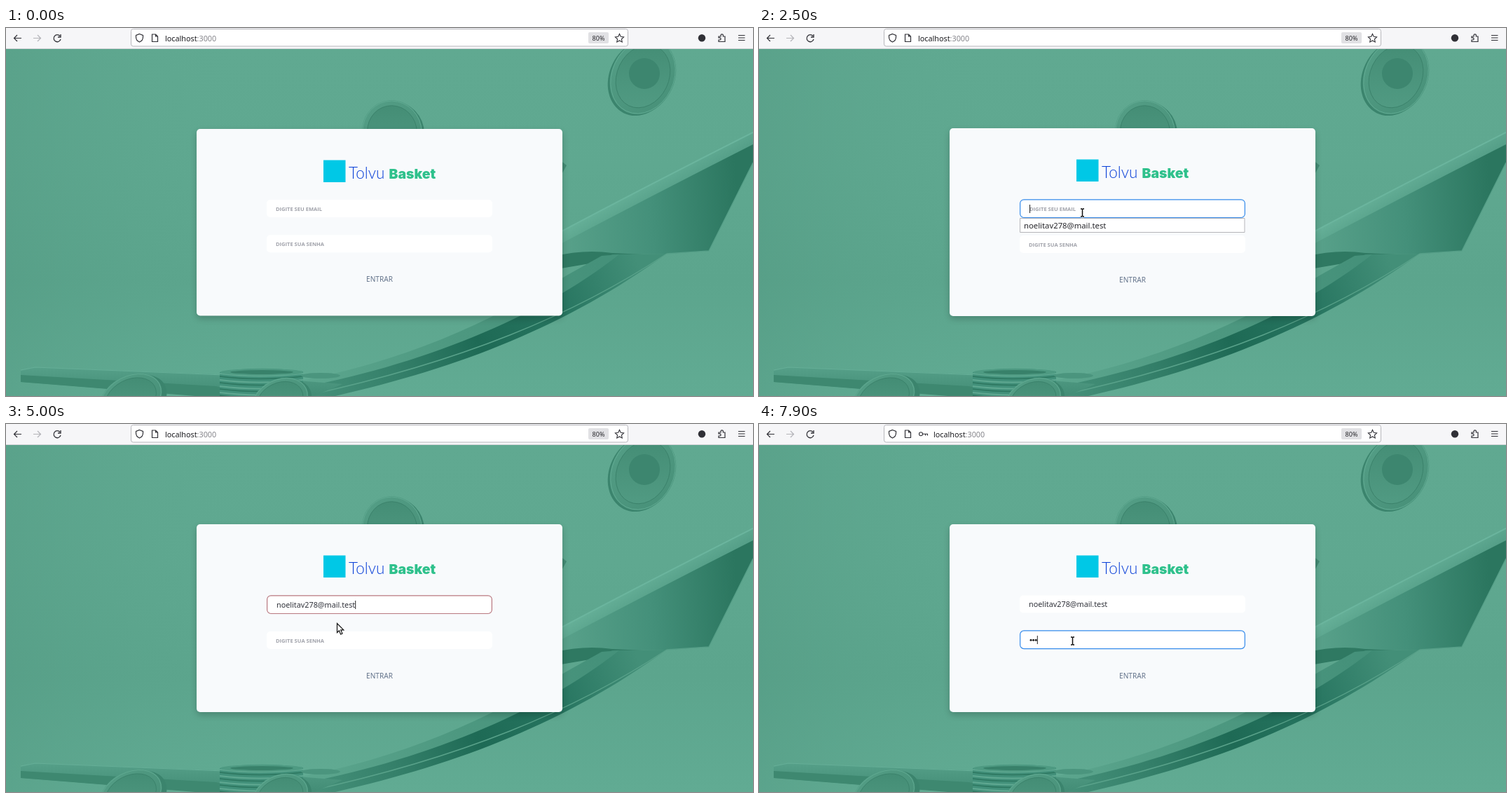
Animation, 1066 px wide and 525 px high, one loop 8 s. Source, as an HTML page with a canvas:

```html
<!DOCTYPE html>
<html lang="pt">
<head>
<meta charset="utf-8">
<title>Login</title>
<style>
html, body { margin: 0; width: 100%; height: 100%; overflow: hidden; }
canvas { display: block; width: 1066px; height: 525px; }
</style>
</head>
<body>
<canvas id="stage" width="1066" height="525"></canvas>
<script>
const W = 1066, H = 525, LOOP = 8000;
const EMAIL = 'noelitav278@mail.test';
const BLUE = [53, 139, 235], RED = [242, 112, 82];
const SANS = '"Noto Sans", sans-serif';
const screen = document.getElementById('stage').getContext('2d');
let ctx = screen;

// Pointer stops: time, x, y, shape; each holds until the next one.
const POINTER = [
  [100, 89, -11, 'arrow'], [300, 225, 120, 'arrow'], [400, 331, 238, 'arrow'],
  [700, 345, 241, 'arrow'], [800, 378, 247, 'beam'], [900, 415, 252, 'beam'],
  [1000, 446, 256, 'beam'], [1100, 461.5, 257.5, 'beam'], [2500, 461.5, 263.5, 'beam'],
  [4200, 467, 271, 'arrow'], [4300, 469, 272, 'arrow'], [4400, 464, 273, 'arrow'],
  [4600, 482, 281, 'arrow'], [4700, 472, 284, 'arrow'], [6200, 468, 287, 'arrow'],
  [6300, 460, 294, 'arrow'], [6400, 451, 304, 'beam'], [6500, 447.5, 309.5, 'beam']
];
const TYPED = [[0, ''], [3900, EMAIL.slice(0, 1)], [4100, EMAIL.slice(0, 2)], [5000, EMAIL]];
const DOTS = [[0, 0], [7600, 1], [7800, 2], [7900, 3]];
const INVALID = [[0, 0], [3900, .3], [4000, .8], [4100, 1], [5000, .7], [5100, .25], [5200, 0]];

const latest = (steps, t) => steps.filter(s => s[0] <= t).pop();

function fill(path, color) {
  ctx.fillStyle = color;
  ctx.fill(typeof path === 'string' ? new Path2D(path) : path);
}

function line(path, color, width = 1.2) {
  ctx.strokeStyle = color;
  ctx.lineWidth = width;
  ctx.stroke(typeof path === 'string' ? new Path2D(path) : path);
}

function box(x, y, w, h, r) {
  const p = new Path2D();
  p.roundRect(x, y, w, h, r);
  return p;
}

function oval(x, y, rx, ry, turn = 0) {
  const p = new Path2D();
  p.ellipse(x, y, rx, ry, turn, 0, Math.PI * 2);
  return p;
}

function fade(x0, y0, x1, y1, ...colors) {
  const g = ctx.createLinearGradient(x0, y0, x1, y1);
  colors.forEach((c, i) => g.addColorStop(i / (colors.length - 1), c));
  return g;
}

function text(s, x, y, font, color, align = 'left') {
  ctx.font = font;
  ctx.fillStyle = color;
  ctx.textAlign = align;
  ctx.fillText(s, x, y);
  return ctx.measureText(s).width;
}

function coin(x, y, rx, ry, turn, depth) {
  fill(oval(x + depth, y + 2, rx, ry, turn), '#3b846d');
  fill(oval(x, y, rx, ry, turn), fade(x - rx, y - ry, x + rx, y + ry, '#559f87', '#468f77'));
  line(oval(x, y, rx - 1, ry - 1, turn), '#60aa92', 1);
  fill(oval(x, y, rx * .82, ry * .83, turn), fade(x, y - ry, x, y + ry, '#438c74', '#529c84'));
  line(oval(x, y, rx * .82, ry * .83, turn), '#3b826b', 1);
}

function backdrop() {
  fill(box(0, 30, W, H - 30, 0), fade(0, 30, 0, H, '#60a991', '#5fa890', '#5ca58d', '#61ab93'));
  fill(box(0, 30, 330, H - 30, 0), fade(0, 0, 330, 0, 'rgba(75,145,122,.28)', 'rgba(90,164,140,0)'));

  // Arrow head and its bright upper edge
  fill('M780 180L800 196L790 214L780 220Z', '#438b74');
  fill('M780 306L1066 163V192L1003 318L943 322L865 323L780 334Z',
    fade(800, 285, 1045, 270, '#57a089', '#44907a', '#2b765f'));
  fill('M780 296Q900 232 1066 148V166Q920 240 780 314Z',
    fade(780, 292, 800, 325, '#68b29a', '#559f88'));
  line('M780 297Q900 233 1066 149', '#6bb59e', 2);
  line('M1066 192L1003 318L943 322', '#569f88', 1.3);
  fill('M780 326Q825 315 865 321L910 323L780 345Z', '#2f7962');

  // Long rising shaft
  fill('M400 512C560 488 720 430 865 323L943 322C800 425 650 484 470 525H380Z',
    fade(430, 520, 900, 330, '#46917a', '#35806a', '#1e6a55', '#277560', '#438f78'));
  fill('M405 506C565 478 690 420 800 353L850 325L875 323C760 414 590 482 410 515Z',
    fade(420, 500, 850, 330, '#5ca68e', '#4d9880', '#45917a'));
  line('M430 524C650 476 810 410 943 322', '#59a28a', 1.4);

  // Flat tail and bottom coins
  fill('M21 489L42 484L300 494L480 508L440 525H280L21 505Z', fade(0, 485, 0, 523, '#559f88', '#438d76'));
  fill('M21 495L300 511L350 525H270L21 505Z', '#3e8870');
  line('M21 488L42 484L310 495', '#65ae97');
  coin(178, 529, 47, 33, -.48, 7);
  fill('M305 491Q360 481 424 490V525H305Z', '#42907a');
  for (let y = 493; y < 525; y += 9) {
    line(`M305 ${y}Q360 ${y + 7} 424 ${y}`, '#5fa891', 2);
    line(`M305 ${y + 4}Q360 ${y + 11} 424 ${y + 4}`, '#2c765f', 1.5);
  }
  fill(oval(365, 491, 59, 5), '#4e9a82');
  fill(oval(365, 491, 45, 3), '#38816a');
  fill(oval(449, 496, 28, 4), '#4b957e');
  coin(391, 532, 42, 31, -.45, 5);

  coin(909, 69, 45, 56, .45, -3);
  fill(oval(911, 65, 22, 22), '#3d866f');
  coin(551, 148, 43, 45, -.2, 3);
}

function toolbar() {
  const ink = '#303036';
  fill(box(0, 0, W, 30, 0), '#f6f6f8');
  fill(box(0, 29, W, 1, 0), '#d3d3d7');
  const address = box(178.5, 1.5, 709, 24.5, 3);
  fill(address, '#fff');
  line(address, '#b7b7bc', 1);
  line('M22 14.5H11.5M16 10L11.5 14.5L16 19', ink);
  line('M39 14.5H49.5M45 10L49.5 14.5L45 19', '#b4b4b8');
  line('M77 11.5A5 5 0 1 0 78 16M78 9V13H74', ink, 1.3);
  line('M190.5 8.5L195.5 10.5V13Q195.5 18 190.5 20Q185.5 18 185.5 13V10.5Z', ink);
  line('M208.5 9H213.5L216.5 12V19.5H208.5ZM213.5 9V12H216.5', ink);
  fill(box(831, 6, 29, 16, 2), '#e1e1e4');
  text('80%', 845.5, 17.5, `9px ${SANS}`, '#28282c', 'center');
  const star = new Path2D();
  for (let i = 0; i < 10; i++) {
    const a = i * Math.PI / 5 - Math.PI / 2, r = i % 2 ? 3.1 : 6.4;
    star.lineTo(875.5 + r * Math.cos(a), 14.8 + r * Math.sin(a));
  }
  star.closePath();
  line(star, ink, 1.1);
  fill(oval(993, 14.3, 5.2, 5.2), ink);
  line('M1017 12H1020V10.5A1.7 1.7 0 0 1 1023.4 10.5V12H1026V19.5H1017V17H1018.5A1.6 1.6 0 0 0 1018.5 13.8H1017Z', ink);
  line('M1045 10.5H1054.5M1045 14H1054.5M1045 17.5H1054.5', ink);
}

function cache(draw) {
  const layer = document.createElement('canvas');
  layer.width = W;
  layer.height = H;
  ctx = layer.getContext('2d');
  draw();
  ctx = screen;
  return layer;
}

function addressText(withKey) {
  const x = withKey ? 249 : 227, font = `10.8px ${SANS}`;
  if (withKey) {
    line(oval(231, 14.3, 2.5, 2.5), '#303036', 1.1);
    line('M233.5 14.3H240.5V16.5M237.5 14.3V16.5', '#303036', 1.1);
  }
  const w = text('localhost', x, 18.5, font, '#1c1c20');
  text(':3000', x + w, 18.5, font, '#85858b');
}

function card(focused) {
  const top = focused ? 143 : 144, height = focused ? 268 : 266.5;
  ctx.save();
  ctx.shadowColor = 'rgba(0,0,0,.2)';
  ctx.shadowBlur = 10;
  ctx.shadowOffsetY = 4;
  fill(box(272, top, 522, height, 5), '#f8fafc');
  ctx.restore();
  fill(box(453, top + 44.5, 31.5, 31.5, 0), '#00c8e6');
  text('Tolvu', 489, top + 71, '300 22.5px Lato, sans-serif', '#0b41d8');
  text('Basket', 546.5, top + 71, '900 19.4px Inter, sans-serif', '#2fc18c');
  text('ENTRAR', 533, focused ? 363 : 362, `10.1px ${SANS}`, '#64748b', 'center');
}

function field(y, active, color, hint) {
  const p = active ? box(372.6, y + .5, 320.8, 25.7, 5.5) : box(372, y, 322, 25, 5);
  fill(p, '#fff');
  if (active) line(p, color, 1.2);
  if (hint) text(hint, active ? 386 : 385, y + (active ? 16.7 : 16), 'bold 7.55px "Open Sans", sans-serif', '#a0a2aa');
}

function caret(x, y) {
  fill(box(x, y, 1, 12, 0), '#222');
}

function pointer(x, y, shape) {
  ctx.save();
  ctx.translate(x, y);
  if (shape === 'arrow') {
    const p = 'M.5 .5V13.5L3.4 10.8L5.6 16L8 15L5.8 9.9H9.8Z';
    fill(p, '#fff');
    line(p, '#111', 1.2);
  } else {
    const p = 'M-2.5 -5.5H-1L0 -4.7L1 -5.5H2.5M-2.5 5.5H-1L0 4.7L1 5.5H2.5M0 -5V5';
    line(p, '#fff', 3.2);
    line(p, '#111', 1.5);
  }
  ctx.restore();
}

function form(t) {
  const onEmail = t >= 1400 && t < 6700, onPassword = t >= 6700;
  const typed = latest(TYPED, t)[1], dots = latest(DOTS, t)[1];
  const red = latest(INVALID, t)[1];
  const edge = `rgb(${BLUE.map((c, i) => Math.round(c + (RED[i] - c) * red))})`;
  const font = `10.8px ${SANS}`;

  card(t >= 1400);
  field(onEmail ? 244.3 : onPassword ? 244.5 : 245, onEmail, edge, typed ? '' : 'DIGITE SEU EMAIL');
  const width = text(typed, onEmail ? 386 : 385, onEmail ? 262 : 261, font, '#30323a');
  if (onEmail && !(t >= 4300 && t < 5000) && t < 6200) caret(386 + width, 252);

  field(onPassword ? 294.4 : onEmail ? 296 : 295.3, onPassword, edge, dots ? '' : 'DIGITE SUA SENHA');
  for (let i = 0; i < dots; i++) fill(oval(388 + i * 3.6, 308.3, 1.5, 1.5), '#222');
  if (onPassword) caret(386 + dots * 3.6, 302);

  if (t >= 1400 && t < 5000) {
    const list = box(372.5, 271.5, 320.5, 20, 0);
    fill(list, '#fff');
    line(list, '#b5b5b9', 1);
    text(EMAIL, 378, 285.5, `11.3px ${SANS}`, '#26262b');
  }
}

const base = cache(() => { backdrop(); toolbar(); });

function draw(t) {
  ctx.drawImage(base, 0, 0);
  addressText(t >= 7700);
  form(t);
  const stop = latest(POINTER, t);
  if (stop) pointer(...stop.slice(1));
}

const start = performance.now();
function tick() {
  draw((performance.now() - start) % LOOP);
  requestAnimationFrame(tick);
}
tick();
</script>
</body>
</html>
```
